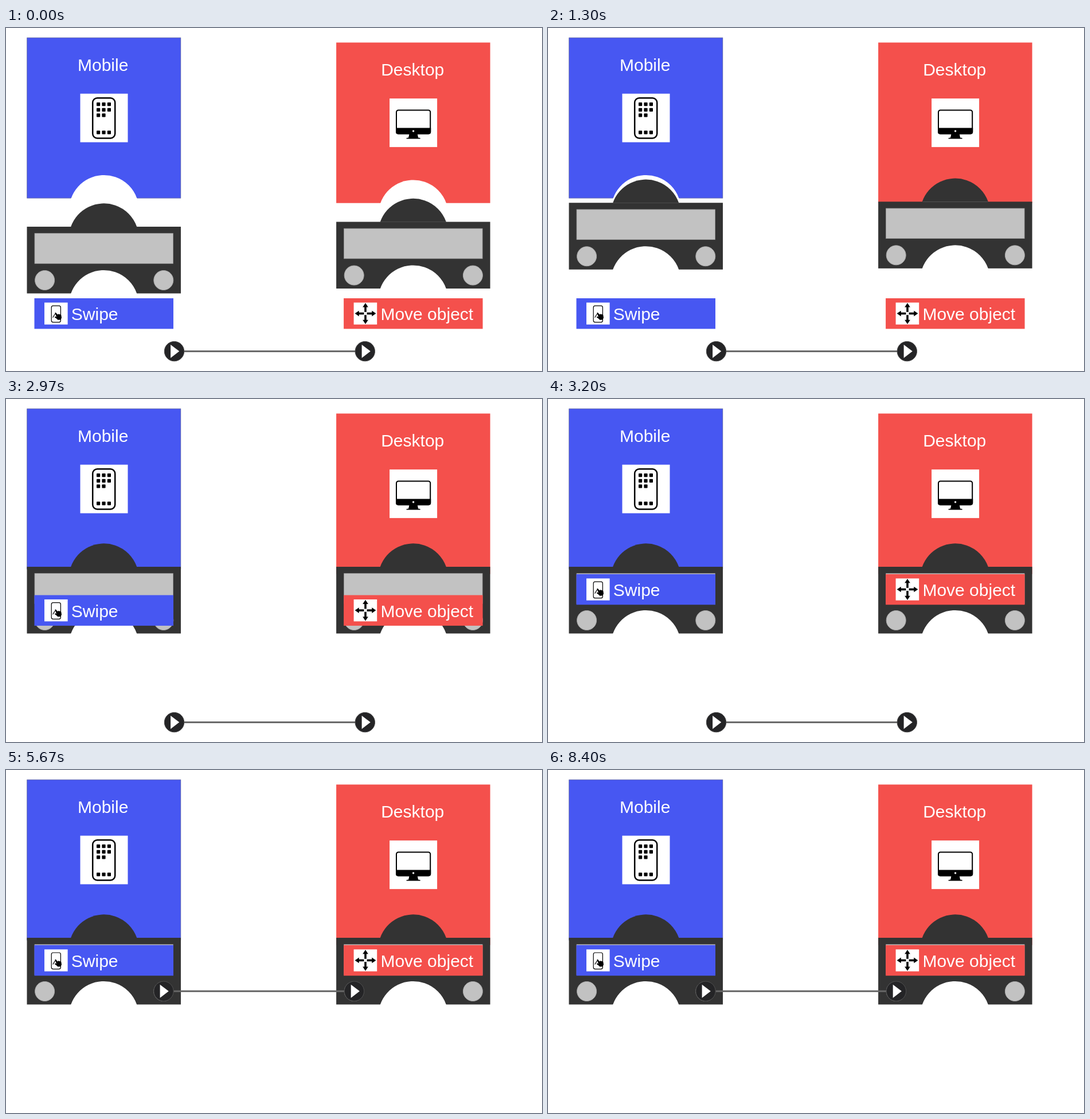
Animation of 935x599 px, one loop 8430 ms. Source, as an HTML page with a canvas:

```html
<!DOCTYPE html>
<html lang="en">
<head>
<meta charset="utf-8">
<title>Mobile and Desktop blocks</title>
<style>
html, body { margin: 0; width: 100%; height: 100%; overflow: hidden; background: #fff; }
canvas { display: block; }
</style>
</head>
<body>
<canvas id="stage" width="935" height="599"></canvas>
<script>
const ctx = document.getElementById('stage').getContext('2d');
const LOOP = 8430;
const BLUE = '#4757f2', RED = '#f4504c', DARK = '#333333', GRAY = '#c2c2c2';
const RIGHT = 539.6;   // horizontal distance between the two columns
const ARC = 61;        // radius of bumps and notches
const MID = 171;       // centre of the left column

const clamp = v => Math.min(1, Math.max(0, v));
const phase = (t, from, to) => clamp((t - from) / (to - from));
const easeInOut = p => p < 0.5 ? 2 * p * p : 1 - 2 * (1 - p) ** 2;
const easeOut = p => 1 - (1 - p) ** 5;
const mix = (a, b, p) => a + (b - a) * p;

function rect(x, y, w, h, color) {
  ctx.fillStyle = color;
  ctx.fillRect(x, y, w, h);
}

function outline(x, y, w, h, color, width = 1) {
  ctx.strokeStyle = color;
  ctx.lineWidth = width;
  ctx.strokeRect(x, y, w, h);
}

function roundRect(x, y, w, h, r) {
  ctx.beginPath();
  ctx.roundRect(x, y, w, h, r);
}

function polygon(points, color) {
  ctx.beginPath();
  points.forEach(([x, y]) => ctx.lineTo(x, y));
  ctx.closePath();
  ctx.fillStyle = color;
  ctx.fill();
}

function disc(x, y, r, color, edge) {
  ctx.beginPath();
  ctx.arc(x, y, r, 0, Math.PI * 2);
  ctx.fillStyle = color;
  ctx.fill();
  if (edge) {
    ctx.strokeStyle = edge;
    ctx.lineWidth = 1;
    ctx.stroke();
  }
}

// Cap of a circle that rises 41 px above a base line
function cap(x, base, color) {
  const half = Math.acos((ARC - 41) / ARC);
  ctx.beginPath();
  ctx.arc(x, base - 41 + ARC, ARC, -Math.PI / 2 - half, -Math.PI / 2 + half);
  ctx.closePath();
  ctx.fillStyle = color;
  ctx.fill();
}

function text(str, x, y) {
  ctx.font = '30px "Liberation Sans", Arial, sans-serif';
  ctx.textBaseline = 'alphabetic';
  ctx.fillStyle = '#fff';
  ctx.fillText(str, x, y);
}

function at(x, y, draw) {
  ctx.save();
  ctx.translate(x, y);
  draw();
  ctx.restore();
}

function phoneIcon() {
  roundRect(151.2, 122.2, 39, 70.3, 8);
  ctx.strokeStyle = '#000';
  ctx.lineWidth = 2.5;
  ctx.stroke();
  ctx.fillStyle = '#000';
  for (const [y, n] of [[130, 3], [139.7, 3], [149.3, 2], [179.3, 3]]) {
    for (let i = 0; i < n; i++) {
      roundRect(158 + i * 9.4, y, 6.2, 6.2, 1);
      ctx.fill();
    }
  }
}

function monitorIcon() {
  roundRect(141.4, 135, 59.2, 41, 3.5);
  ctx.strokeStyle = '#000';
  ctx.lineWidth = 2;
  ctx.stroke();
  roundRect(140.4, 166, 61.2, 11, [0, 0, 4, 4]);
  ctx.fillStyle = '#000';
  ctx.fill();
  disc(171, 171.6, 1.7, '#fff');
  polygon([[164, 176], [178, 176], [179.5, 183], [183, 183.6], [183, 185.2],
           [159, 185.2], [159, 183.6], [162.5, 183]], '#000');
}

// Device card, its notch open at the bottom
function card(title, titleX, color, edge, icon) {
  rect(36.5, 17, 268.5, 280.3, color);
  if (edge) outline(36.8, 17, 268, 280, edge, 0.8);
  cap(MID, 298, '#fff');
  rect(MID - 58, 297.6, 116, 1, '#fff');
  text(title, titleX, 75);
  rect(129.5, 114.7, 83, 84.8, '#fff');
  icon();
}

function block() {
  rect(36.5, 0, 268.5, 116.5, DARK);
  cap(MID - 0.3, 0.3, DARK);
  cap(MID - 0.3, 117, '#fff');
  rect(50, 11.7, 241.5, 52.6, GRAY);
  outline(50, 11.7, 241.5, 52.6, '#999', 0.8);
  disc(67.6, 93.5, 17, GRAY, '#aaa');
  disc(274.8, 93.5, 17, GRAY, '#aaa');
}

function swipeIcon() {
  roundRect(79.2, 13.2, 16.2, 28.6, 3);
  ctx.strokeStyle = '#000';
  ctx.lineWidth = 1.2;
  ctx.stroke();
  ctx.beginPath();
  ctx.moveTo(81.5, 33.5);
  ctx.bezierCurveTo(84, 32, 84, 27, 87, 26.5);
  ctx.stroke();
  polygon([[85.2, 25.2], [87, 25], [89.8, 28.6], [91.2, 27.2], [92.6, 28.2],
           [94, 27.6], [95, 29], [96.3, 29.2], [97, 34], [95.5, 37.4],
           [90.5, 37.8], [87.5, 35], [84.8, 33.2], [85.8, 31.8], [88, 32.2]], '#000');
}

function moveIcon() {
  at(87.4, 26.6, () => {
    for (let i = 0; i < 4; i++) {
      rect(2.6, -1.8, 10, 3.6, '#000');
      polygon([[11.2, -4.8], [18.4, 0], [11.2, 4.8]], '#000');
      ctx.rotate(Math.PI / 2);
    }
  });
}

function label(str, color, icon) {
  rect(49.5, 0, 242.5, 53.4, color);
  rect(67, 7.5, 40.6, 38.3, '#fff');
  icon();
  text(str, 113.8, 38);
}

function knob(x, y, shift) {
  disc(x, y, 17.2, '#242426', '#4a4a4a');
  const left = x - 6.4 + shift;
  polygon([[left, y - 11.6], [left + 15.2, y], [left, y + 11.6]], '#fff');
}

function connector(p) {
  const y = mix(564.6, 386.3, p);
  const a = mix(293.5, 275, p), b = mix(626.3, 607.4, p);
  rect(a, y - 1.5, b - a, 3, '#666');
  knob(a, y, 0);
  knob(b, y, 0.7);
}

function draw(t) {
  rect(0, 0, 935, 599, '#fff');

  at(0, 0, () => card('Mobile', 125, BLUE, '#666b9e', phoneIcon));
  at(RIGHT, 8.4, () => card('Desktop', 114.6, RED, null, monitorIcon));

  const lift = easeInOut(phase(t, 915, 1497));
  at(0, mix(347, 293, lift), block);
  at(RIGHT, mix(338.5, 293, lift), block);

  const labelY = mix(472, 305.8, easeOut(phase(t, 2855, 3300)));
  at(0, labelY, () => label('Swipe', BLUE, swipeIcon));
  at(RIGHT, labelY, () => label('Move object', RED, moveIcon));

  connector(easeInOut(phase(t, 4306, 4770)));
}

const start = performance.now();
function tick() {
  draw((performance.now() - start) % LOOP);
  requestAnimationFrame(tick);
}
tick();
</script>
</body>
</html>
```
